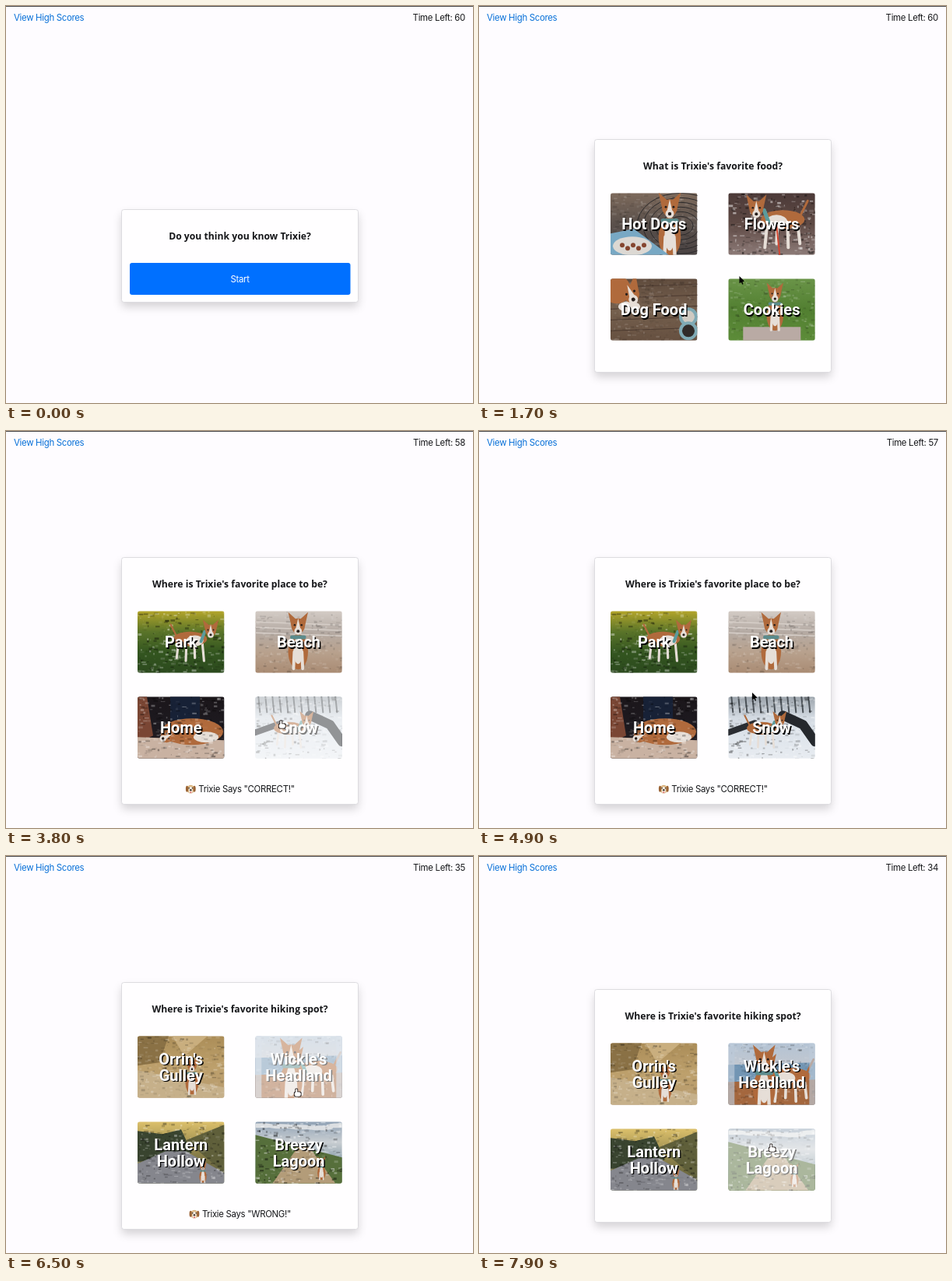
Recreate the animation shown at these times as an HTML page with a canvas. Size 600 by 510 pixels, loop 8 s.

```html
<!DOCTYPE html>
<html lang="en">
<head>
<meta charset="utf-8">
<title>Dog quiz</title>
<style>
  html, body { margin: 0; width: 100%; height: 100%; overflow: hidden; background: #fefcff; }
  canvas { display: block; width: 600px; height: 510px; }
</style>
</head>
<body>
<canvas id="stage"></canvas>
<script>
const canvas = document.getElementById('stage');
const c = canvas.getContext('2d');
const dpr = window.devicePixelRatio || 1;
canvas.width = 600 * dpr;
canvas.height = 510 * dpr;

const LOOP = 8000, STEP = 100, MID = 300.5;
const IMG_W = 111.5, IMG_H = 79.5;
const UI = '11.4px Inter, sans-serif';
const HEAD = 'bold 12.2px "Open Sans", sans-serif';
const LABEL = 'bold 20px Roboto, sans-serif';
const FUR = '#b06a3c', WHITE = '#e6ded7', DARK = '#251d1b', INK = '#151619';

// ---- drawing helpers ----
function rect(color, x, y, w, h) {
  c.fillStyle = color;
  c.fillRect(x, y, w, h);
}
function rounded(color, x, y, w, h, r = 3) {
  c.beginPath();
  c.roundRect(x, y, w, h, r);
  c.fillStyle = color;
  c.fill();
}
function oval(color, x, y, rx, ry = rx) {
  c.fillStyle = color;
  c.beginPath();
  c.ellipse(x, y, rx, ry, 0, 0, 7);
  c.fill();
}
function trace(pts) {
  c.beginPath();
  for (let i = 0; i < pts.length; i += 2) c.lineTo(pts[i], pts[i + 1]);
}
function poly(color, ...pts) {
  trace(pts);
  c.fillStyle = color;
  c.fill();
}
function line(color, width, ...pts) {
  trace(pts);
  c.strokeStyle = color;
  c.lineWidth = width;
  c.lineCap = c.lineJoin = 'round';
  c.stroke();
}
function placed(x, y, sx, sy, turn, paint) {
  c.save();
  c.translate(x, y);
  c.rotate(turn);
  c.scale(sx, sy);
  paint();
  c.restore();
}
function text(str, x, y, font, color, align = 'left', spacing = 0) {
  c.font = font;
  c.letterSpacing = spacing + 'px';
  c.textAlign = align;
  c.fillStyle = color;
  c.fillText(str, x, y);
}
const ui = (str, x, y, color, align) => text(str, x, y, UI, color, align, -0.3);

// ---- picture parts ----
function random(seed) {
  return () => (seed = (seed * 16807) % 2147483647) / 2147483647;
}
function backdrop(...colors) {
  const g = c.createLinearGradient(0, 0, 0, IMG_H);
  colors.forEach((col, i) => g.addColorStop(i / (colors.length - 1), col));
  rect(g, 0, 0, IMG_W, IMG_H);
}
// Light and dark flecks that lend a surface its texture.
function grain(seed, strength = 0.16) {
  const rnd = random(seed * 7919);
  for (let i = 0; i < 320; i++) {
    const tone = i % 2 ? 0 : 255;
    rect(`rgba(${tone},${tone},${tone},${strength * rnd()})`,
      rnd() * IMG_W, rnd() * IMG_H, 1 + 5 * rnd(), 1 + 2 * rnd());
  }
}
// Fills everything below an edge running from the left side to the right side.
function slope(color, left, right) {
  poly(color, 0, left, IMG_W, right, IMG_W, IMG_H, 0, IMG_H);
}
function face(x, y, s, turn = 0) {
  placed(x, y, s, s, turn, () => {
    for (const k of [-1, 1]) poly(FUR, k * 9, 0, k * 13, -18, k * 2, -8);
    oval(FUR, 0, 0, 9, 10);
    poly(WHITE, 0, -10, 4, 8, -4, 8);
    oval(WHITE, 0, 7, 5);
    oval(DARK, 0, 7, 2);
    for (const k of [-1, 1]) oval(DARK, k * 4.5, -1, 1.3);
  });
}
function sit(x, y, s) {
  placed(x, y, s, s, 0, () => {
    oval(FUR, 0, 34, 13, 23);
    oval(WHITE, 0, 32, 6, 18);
    for (const k of [-1, 1]) line(WHITE, 4, k * 5, 34, k * 6, 56);
    line('#5b8b8c', 5, -8, 15, 8, 15);
  });
  face(x, y, s);
}
function stand(x, y, s, dir = 1) {
  placed(x, y, s * dir, s, 0, () => {
    line(FUR, 3, 56, 10, 66, -10);
    for (let i = 0; i < 4; i++) line(WHITE, 4, 14 + i * 13, 18, 11 + i * 15, 50 - (i % 2) * 5);
    oval(FUR, 34, 14, 28, 12);
    oval(WHITE, 26, 17, 14, 9);
    line('#5b9b9c', 5, 10, 2, 16, 18);
  });
  face(x, y, s);
}

// ---- pictures, each in its own box ----
const scenes = {
  patio() {
    backdrop('#7d6a5c', '#5a504b', '#4a4343');
    grain(3);
    for (let r = 16; r < 60; r += 8) {
      c.beginPath();
      c.ellipse(90, 42, r, r * 0.75, 0, 0, 7);
      c.strokeStyle = '#2c2a2b';
      c.stroke();
    }
    sit(76, 19, 1.1);
    poly('#78a8c4', 0, 52, 30, 46, 75, IMG_H, 0, IMG_H);
    oval('#dcd8d3', 28, 68, 25, 12);
    for (let i = 0; i < 5; i++) oval('#85452f', 15 + i * 7, 67 + (i % 2) * 4, 3);
  },
  leaves() {
    backdrop('#4c3a38', '#5f4a45', '#8d7b78');
    grain(5, 0.5);
    stand(36, 20, 1);
    line('#d34732', 2, 62, 42, 66, IMG_H);
  },
  bowls() {
    backdrop('#5f4b3d', '#75604e', '#665040');
    for (let y = 11; y < IMG_H; y += 14) line('#4c3a30', 1, 0, y, IMG_W, y - 4);
    grain(9);
    oval(FUR, 8, 14, 18);
    oval(WHITE, 24, 36, 14, 7);
    face(26, 19, 1.2, -0.4);
    for (const y of [49, 67]) {
      oval('#7faab5', 100, y, 12);
      oval(y > 50 ? '#302b29' : '#cfcac2', 100, y, 8);
    }
  },
  lawn() {
    backdrop('#6a9448', '#527f31', '#5d8c39');
    grain(12, 0.2);
    rect('#b9aaa4', 19, 62, 74, 18);
    sit(60, 20, 0.82);
  },
  park() {
    backdrop('#b3a52a', '#5a7429', '#33551f', '#2c4a1e');
    grain(16, 0.4);
    stand(94, 25, 0.78, -1);
  },
  beach() {
    backdrop('#d3cbc5', '#b5aba4', '#b8a18d', '#a98b73');
    for (let y = 14; y < 34; y += 7) line('#d6cec8', 1.5, 0, y, IMG_W, y + 4);
    grain(21);
    sit(55, 19, 0.98);
  },
  sofa() {
    backdrop('#1b161a', '#1d1a20', '#2a2021');
    poly('#7a4634', 0, 0, 12, 0, 20, 50, 0, 60);
    rect('#172136', 42, 0, 38, 30);
    slope('#c9b2a2', 52, 56);
    oval(FUR, 70, 45, 40, 17);
    oval(WHITE, 88, 52, 16, 7);
    face(38, 51, 0.85, 1.1);
    grain(25, 0.35);
  },
  snow() {
    backdrop('#9ba3ab', '#d3dae2', '#dfe5ec', '#e8ecf1');
    for (let x = 4; x < IMG_W; x += 9) line('#4b5157', 1 + x % 3, x, 0, x + 2, 20);
    grain(29, 0.4);
    line('#2a2d32', 8, 0, 46, 34, 34);
    line('#25282d', 12, 70, 24, 96, 36, IMG_W, 58);
    stand(66, 31, 0.68, -1);
  },
  canyon() {
    backdrop('#ab8d58', '#bda06c', '#b79b70');
    poly('#8a7145', 0, 0, 40, 0, 28, 34, 0, 38);
    poly('#c9ae7e', 45, 0, 90, 0, 60, 26);
    slope('#c6b08a', 44, 66);
    grain(34, 0.25);
    sit(70, 38, 0.65);
  },
  summit() {
    backdrop('#b3c3d4', '#c8c9ce', '#c9c0b8');
    slope('#7295b3', 28, 25);
    slope('#a4673e', 50, 47);
    grain(38, 0.25);
    stand(50, 30, 0.9);
    sit(46, 22, 1.1);
    for (const x of [0, 104]) rect('rgba(190,203,218,.65)', x, 0, 8, IMG_H);
  },
  trail() {
    backdrop('#dcc06b', '#8b8049', '#4c5038');
    poly('#39442f', 0, 12, 32, 16, 56, 10, 70, 40, 0, 52);
    poly('#5f5f3a', 62, 24, IMG_W, 4, IMG_W, 66);
    poly('#85868d', 36, 38, 62, 38, IMG_W, 66, IMG_W, IMG_H, 0, IMG_H, 0, 54);
    grain(42, 0.35);
    sit(84, 58, 0.36);
  },
  shore() {
    backdrop('#8fa1b4', '#c9ced2', '#7f95a2', '#6f8250');
    for (let x = 8; x < IMG_W; x += 25) oval('#dcdfe2', x, 5 + x % 4, 17, 3);
    slope('#566f3b', 17, 46);
    poly('#b39c79', 55, 32, 69, 32, 103, IMG_H, 22, IMG_H);
    grain(47, 0.45);
    sit(85, 52, 0.4);
  }
};

const quiz = [
  { title: "What is Trixie's favorite food?",
    picks: [['Hot Dogs', 'patio'], ['Flowers', 'leaves'], ['Dog Food', 'bowls'], ['Cookies', 'lawn']] },
  { title: "Where is Trixie's favorite place to be?",
    picks: [['Park', 'park'], ['Beach', 'beach'], ['Home', 'sofa'], ['Snow', 'snow']] },
  { title: "Where is Trixie's favorite hiking spot?",
    picks: [["Orrin's|Gulley", 'canyon'], ["Wickle's|Headland", 'summit'],
            ['Lantern|Hollow', 'trail'], ['Breezy|Lagoon', 'shore']] }
];

// ---- timeline ----
const START = 1300, RIGHT = 3700, WRONG = 5900, CLEAR = 7800;
const FIRST_TICK = 2400, PENALTY = 20;
const APPEAR = 600, GLIDE = 500;
const moves = [
  { at: APPEAR, x: 334.5, y: 347 },
  { at: 3100, x: 352, y: 372 },
  { at: 4000, x: 351, y: 336 },
  { at: 5000, x: 372, y: 299 },
  { at: 7300, x: 374, y: 370 }
];

function pointer(t) {
  if (t < APPEAR) return null;
  return moves.reduce((p, m) => {
    const k = Math.min(Math.max((t - m.at) / GLIDE, 0), 1);
    const e = k * k * (3 - 2 * k);
    return { x: p.x + (m.x - p.x) * e, y: p.y + (m.y - p.y) * e };
  }, { x: 392, y: 440 });
}
function timeLeft(t) {
  const ticks = Math.max(0, Math.floor((t - FIRST_TICK) / 1000) + 1);
  return 60 - ticks - (t >= WRONG ? PENALTY : 0);
}
const inside = (p, x, y, w, h) => p && p.x >= x && p.x <= x + w && p.y >= y && p.y <= y + h;

// ---- parts of the page ----
function card(top, height, title) {
  c.save();
  c.shadowColor = 'rgba(0,0,0,.17)';
  c.shadowBlur = 12 * dpr;
  c.shadowOffsetY = 6 * dpr;
  rounded('#fffeff', 148.5, top + 0.5, 304, height - 1);
  c.shadowColor = 'transparent';
  c.strokeStyle = '#dddce0';
  c.lineWidth = 1;
  c.stroke();
  c.restore();
  text(title, MID, top + 39, HEAD, INK, 'center');
}
function label(str) {
  const rows = str.split('|');
  rows.forEach((row, i) => {
    const x = IMG_W / 2, y = 47 + (i - (rows.length - 1) / 2) * 20.5;
    text(row, x + 1.4, y + 1.4, LABEL, '#000', 'center');
    text(row, x, y, LABEL, '#fff', 'center');
  });
}
function choice([name, scene], x, y, hover) {
  c.save();
  c.translate(x, y);
  c.beginPath();
  c.roundRect(0, 0, IMG_W, IMG_H, 3);
  c.clip();
  scenes[scene]();
  label(name);
  if (hover) rect('rgba(255,255,255,.5)', 0, 0, IMG_W, IMG_H);
  c.restore();
}
function puppy(x, y) {
  oval('#d9b27c', x, y, 5, 5.5);
  oval('#f3e9dc', x, y + 1, 2.5, 4.5);
  for (const k of [-1, 1]) {
    oval('#9a6335', x + k * 4.8, y - 0.5, 1.6, 4);
    oval(DARK, x + k * 2.2, y - 1.5, 0.8);
  }
  oval(DARK, x, y + 1, 1.4, 1);
  oval('#df7777', x, y + 4, 1.1);
}
function verdict(word, y) {
  const str = `Trixie Says "${word}!"`, gap = 8.5;
  ui(str, MID + gap, y, INK, 'center');
  puppy(MID - c.measureText(str).width / 2 - 1.5, y - 4);
}
function cursor({ x, y }, hand) {
  placed(x, y, 1, 1, 0, () => {
    if (hand) {
      for (const [color, grow] of [[DARK, 0.6], ['#fff', -0.3]]) {
        rounded(color, -grow, -grow, 2.6 + 2 * grow, 8 + 2 * grow, 1.3);
        rounded(color, -1.5 - grow, 4 - grow, 8.5 + 2 * grow, 6 + 2 * grow, 2);
      }
    } else {
      poly('#000', 0, 0, 0, 9, 6.5, 6.5);
      line('#000', 1.5, 2.5, 6, 4.2, 10);
    }
  });
}

function startPage(p) {
  const box = [159, 330, 283.5, 41];
  const hover = inside(p, ...box);
  card(261, 120, 'Do you think you know Trixie?');
  rounded(hover ? '#0062d9' : '#0070ff', ...box);
  ui('Start', MID, 354.5, '#fff', 'center');
  return hover;
}
function quizPage(t, p) {
  const told = t >= RIGHT && t < CLEAR;
  const top = told ? 162 : 171;
  const { title, picks } = quiz[(t >= RIGHT) + (t >= WRONG)];
  let hand = false;
  card(top, told ? 318 : 300, title);
  picks.forEach((pick, i) => {
    const x = 169 + (i % 2) * 151.3, y = top + 69.3 + (i >> 1) * 110;
    const over = inside(p, x, y, IMG_W, IMG_H);
    hand = hand || over;
    choice(pick, x, y, over);
  });
  if (told) verdict(t < WRONG ? 'CORRECT' : 'WRONG', top + 302.2);
  return hand;
}
function draw(t) {
  c.setTransform(dpr, 0, 0, dpr, 0, 0);
  rect('#fefcff', 0, 0, 600, 510);
  rect('#4a494c', 0, 0, 600, 1);
  ui('View High Scores', 10, 18.5, '#0870d8');
  ui('Time Left: ' + timeLeft(t), 590, 18.5, INK, 'right');
  const p = pointer(t);
  const hand = t < START ? startPage(p) : quizPage(t, p);
  if (p) cursor(p, hand);
}

const began = performance.now();
function tick() {
  const t = (performance.now() - began) % LOOP;
  draw(Math.floor(t / STEP) * STEP);
  requestAnimationFrame(tick);
}
tick();
</script>
</body>
</html>
```
